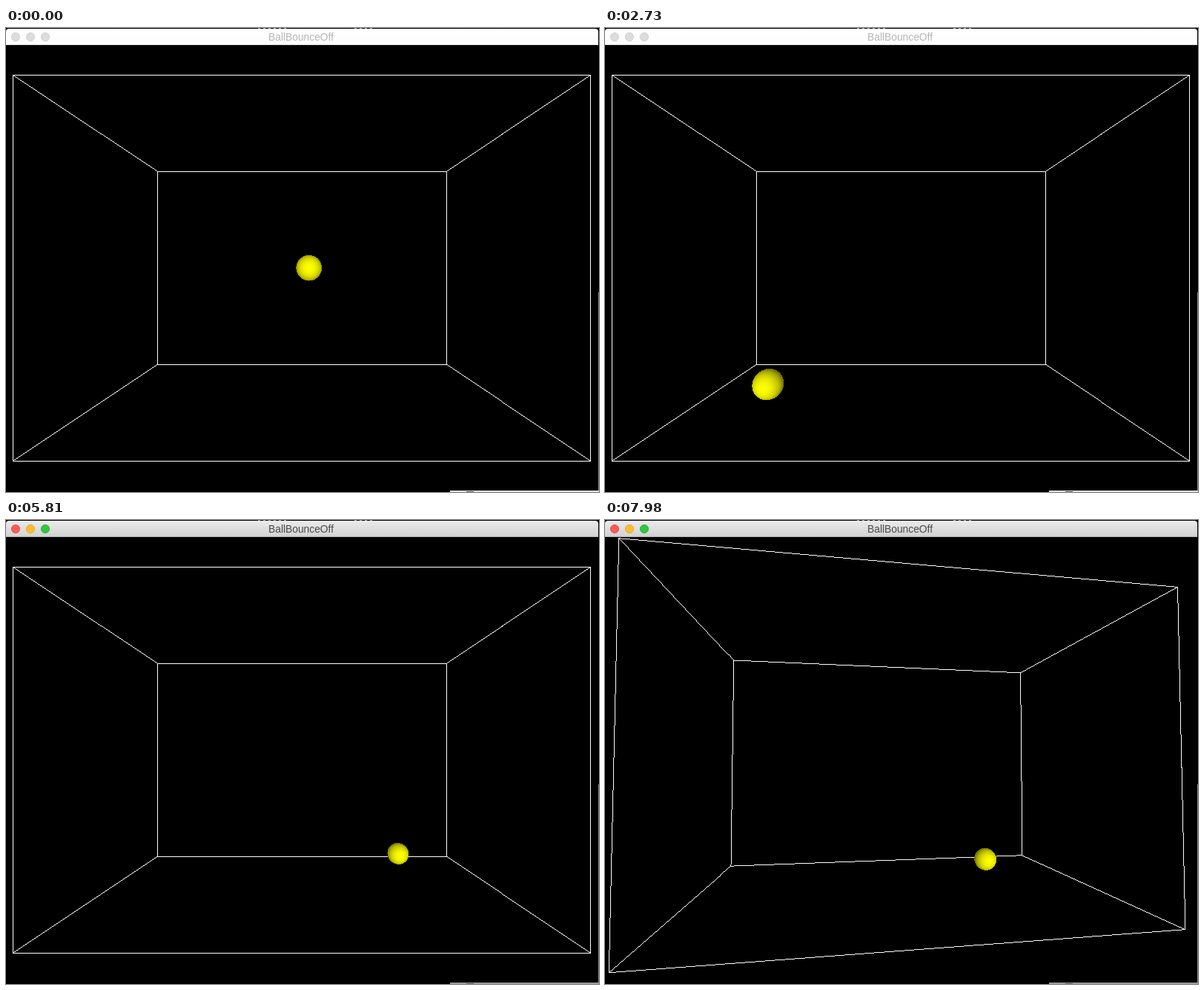
An HTML page with a canvas for the animation above (8 s loop, 800 by 625 pixels).

```html
<!DOCTYPE html>
<html lang="en">
<head>
<meta charset="utf-8">
<title>BallBounceOff</title>
<style>
  html, body { margin: 0; width: 100%; height: 100%; overflow: hidden; background: #000; }
  canvas { display: block; width: 800px; height: 625px; }
</style>
</head>
<body>
<canvas id="stage" width="800" height="625"></canvas>
<script>
const ctx = document.getElementById('stage').getContext('2d');
const LOOP = 8000, STEP = 70, ACTIVATE = 5.53;
const CX = 399.2, CY = 323.2, FOCAL = 300 / Math.tan(Math.PI / 6), CAMERA = 3;
const RADIUS = 0.1, FLOOR = -0.9, HALF_GRAVITY = 0.7675;
const BOUNCES = [-1.117, 1.05, 2.54, 3.59, 4.29, 4.77, 5.1, 5.32, 5.47];

// Every pair of box corners that differs in one axis is an edge.
const corners = [...Array(8).keys()].map(i => [i & 1 ? 1.5 : -1.5, i & 2 ? 1 : -1, i & 4 ? 1 : -1]);
const edges = [];
for (let i = 0; i < 8; i++) {
  for (const bit of [1, 2, 4]) if (!(i & bit)) edges.push([corners[i], corners[i | bit]]);
}

function ease(t, start, end, from, to) {
  const k = Math.min(1, Math.max(0, (t - start) / (end - start)));
  return from + (to - from) * (1 - Math.cos(Math.PI * k)) / 2;
}

function yawAt(t) {
  const degrees = t < 7.14 ? ease(t, 5.88, 7.14, 0, 65.8)
    : t < 7.8 ? ease(t, 7.14, 7.8, 65.8, 5.5)
    : ease(t, 7.8, 7.98, 5.5, 9.15);
  return degrees * Math.PI / 180;
}

function pitchAt(t) {
  return t < 7.21 ? ease(t, 6.3, 7.14, 0, 0.042) : ease(t, 7.21, 7.98, 0.042, 0.031);
}

function ballAt(t) {
  const rightward = Math.min(0.061 + 0.588 * (t - 4.34), 1.17 - 0.392 * (t - 7.21), 1.4);
  const x = Math.max(-1.4, t < 1.8 ? 0.055 - 0.82 * t : rightward);
  const inward = Math.min(0.62 * t, 0.9, -0.15 - 0.37 * (t - 4.3));
  const z = Math.max(inward, -0.653 + 0.24 * (t - 7.21));
  const next = BOUNCES.findIndex(b => b > t);
  const y = next < 0 ? FLOOR : FLOOR + HALF_GRAVITY * (t - BOUNCES[next - 1]) * (BOUNCES[next] - t);
  return [x, y, z];
}

function rotator(yaw, pitch) {
  const s = Math.sin(yaw), c = Math.cos(yaw), ps = Math.sin(pitch), pc = Math.cos(pitch);
  return ([x, y, z]) => {
    const depth = z * c - x * s;
    return [x * c + z * s, y * pc + depth * ps, depth * pc - y * ps];
  };
}

function project([x, y, z]) {
  const scale = FOCAL / (CAMERA - z);
  return [CX + x * scale, CY - y * scale];
}

// One-pixel line without antialiasing.
function drawLine(a, b) {
  const [x0, y0] = project(a), [x1, y1] = project(b);
  const count = Math.ceil(Math.max(Math.abs(x1 - x0), Math.abs(y1 - y0)));
  ctx.fillStyle = '#fff';
  for (let i = 0; i <= count; i++) {
    const k = i / count;
    ctx.fillRect(Math.floor(x0 + (x1 - x0) * k), Math.floor(y0 + (y1 - y0) * k), 1, 1);
  }
}

// Ray-cast sphere with a directional light.
function drawBall([bx, by, bz], light) {
  const center = [bx, by, bz - CAMERA];
  const [px, py] = project([bx, by, bz]).map(Math.round);
  const limit = center[0] ** 2 + center[1] ** 2 + center[2] ** 2 - RADIUS ** 2;
  for (let y = py - 36; y <= py + 36; y++) {
    for (let x = px - 36; x <= px + 36; x++) {
      const ray = [(x + 0.5 - CX) / FOCAL, (CY - y - 0.5) / FOCAL, -1];
      const a = ray[0] ** 2 + ray[1] ** 2 + 1;
      const b = ray[0] * center[0] + ray[1] * center[1] - center[2];
      const root = b * b - a * limit;
      if (root < 0) continue;
      const hit = (b - Math.sqrt(root)) / a;
      const facing = ray.reduce((sum, d, i) => sum + (d * hit - center[i]) / RADIUS * light[i], 0);
      const level = Math.round(255 * Math.min(1, 0.45 + 0.55 * Math.max(0, facing)));
      ctx.fillStyle = `rgb(${level},${level},0)`;
      ctx.fillRect(x, y, 1, 1);
    }
  }
}

function drawWindow(active) {
  ctx.fillStyle = '#000';
  ctx.fillRect(0, 0, 800, 625);

  // Slivers of what lies behind the window.
  ctx.fillStyle = '#999';
  for (const [from, to] of [[340, 376], [470, 492]]) {
    for (let x = from; x < to; x += 7) ctx.fillRect(x, 0, 3, 1);
  }
  ctx.fillStyle = active ? '#999' : '#ddd';
  ctx.fillRect(599, 623, 201, 2);
  ctx.fillStyle = '#555';
  ctx.fillRect(621, 624, 10, 1);
  ctx.fillStyle = '#888';
  ctx.fillRect(799, 356, 1, 267);

  const bar = ctx.createLinearGradient(0, 1, 0, 22);
  bar.addColorStop(0, active ? '#ebebeb' : '#fff');
  bar.addColorStop(1, active ? '#d2d2d2' : '#fcfcfc');
  ctx.fillStyle = bar;
  ctx.beginPath();
  ctx.roundRect(0, 1, 799, 22, [4, 4, 0, 0]);
  ctx.fill();
  ctx.fillStyle = active ? '#b4b4b4' : '#dedede';
  ctx.fillRect(0, 22, 799, 1);

  const fills = active ? ['#fc5b57', '#fdbc30', '#2fc840'] : Array(3).fill('#dcdcdc');
  const rims = active ? ['#e0443f', '#dea123', '#1bac2c'] : Array(3).fill('#cbcbcb');
  fills.forEach((fill, i) => {
    ctx.beginPath();
    ctx.arc(13 + 20 * i, 12, 5.6, 0, 2 * Math.PI);
    ctx.fillStyle = fill;
    ctx.fill();
    ctx.lineWidth = 0.8;
    ctx.strokeStyle = rims[i];
    ctx.stroke();
  });

  ctx.font = '13.8px "Liberation Sans", Arial, sans-serif';
  ctx.textAlign = 'center';
  ctx.fillStyle = active ? '#4a4a4a' : '#b6b6b6';
  ctx.fillText('BallBounceOff', 398, 17);
}

function draw(t) {
  drawWindow(t >= ACTIVATE);
  const rotate = rotator(yawAt(t), pitchAt(t));
  const ball = rotate(ballAt(t));
  const lines = edges.map(edge => edge.map(rotate));
  const inFront = ([a, b]) => (a[2] + b[2]) / 2 > ball[2];

  ctx.save();
  ctx.beginPath();
  ctx.rect(0, 23, 799, 600);
  ctx.clip();
  lines.filter(line => !inFront(line)).forEach(line => drawLine(...line));
  drawBall(ball, rotate([0, 0, 1]));
  lines.filter(inFront).forEach(line => drawLine(...line));
  ctx.restore();
}

let shown = -1;
function tick() {
  const step = Math.floor(performance.now() % LOOP / STEP);
  if (step !== shown) draw(step * STEP / 1000);
  shown = step;
  requestAnimationFrame(tick);
}
tick();
</script>
</body>
</html>
```
